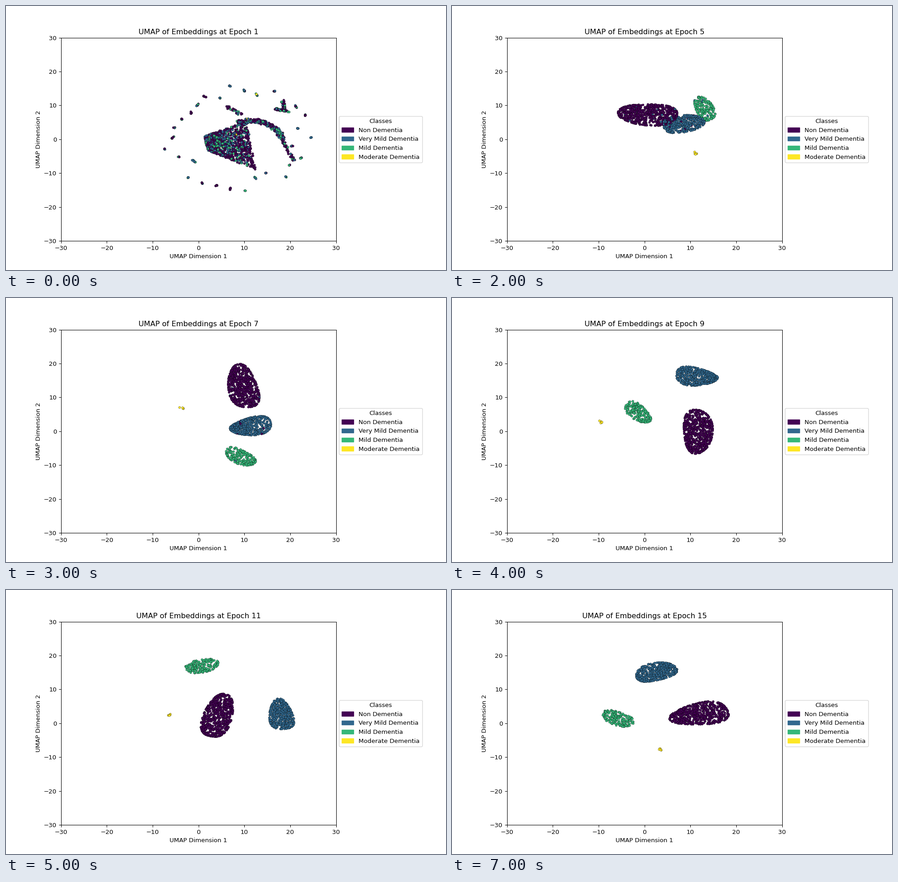
A matplotlib script for the animation above (7500 ms loop, 966x580 px).

```python
import numpy as np
import matplotlib.pyplot as plt
from matplotlib.animation import FuncAnimation
from matplotlib.patches import Patch

W, H, DPI = 966, 580, 96.6
COLORS = np.array(["#440154", "#31688e", "#35b779", "#fde725"])
NAMES = ["Non Dementia", "Very Mild Dementia", "Mild Dementia", "Moderate Dementia"]
COUNTS = [640, 448, 179]
SIZES = [(6.4, 3.1), (4.5, 2.5), (3.6, 1.9)]

# Per class: centre x, y, tilt in degrees, taper; the last pair is the small fourth class.
LAYOUTS = {
    5: [(0.9, 7.3, -3, 0), (8.4, 4.6, 10, 0), (13.1, 9, -70, 0), (11.1, -4.2)],
    7: [(9.7, 13.2, -80, 0.1), (11.2, 1.4, 12, 0.45), (9.1, -7.5, -35, 0), (-3.6, 6.7)],
    9: [(11.6, -0.2, -90, -0.15), (11.6, 16.1, -8, -0.5), (-1.4, 5.5, -50, -0.2), (-9.5, 2.8)],
    11: [(4.2, 2.1, 76, 0), (18, 2.6, -82, 0.2), (0.7, 16.9, 15, 0), (-6.5, 2.4)],
    13: [(15.2, 1.2, 72, 0.2), (1.5, 12.3, 5, 0), (2, -2.5, 85, 0), (-6.9, 0)],
    15: [(12, 2.7, 10, 0.2), (2.6, 15.2, 15, -0.1), (-5.8, 1.4, -25, 0), (3.3, -7.6)],
}

BODY = np.array([[1.3, 0.9], [10.5, 5.5], [1.8, -3.2], [12.5, -9]])
STRANDS = [
    ((18.2, 0), (20.9, -6.5)), ((18.5, 11.4), (18.7, 8.8)),
    ((16.7, 9), (19.7, 8.2)), ((6.2, 9.6), (9.4, 7.2)),
]


def blob(n, centre, size, tilt, taper, rng):
    """n points in a tilted, tapered rounded shape, some of them on its rim."""
    angle = rng.uniform(0, 2 * np.pi, n)
    radius = np.sqrt(np.minimum(rng.uniform(0, 1.17, n), 1))
    radius *= 1 + 0.05 * np.sin(3 * angle + rng.uniform(0, 6))
    c, s = np.cos(angle), np.sin(angle)
    u = radius * np.sign(c) * np.abs(c) ** 0.88
    v = radius * np.sign(s) * np.abs(s) ** 0.88 * (1 + taper * u)
    x, y = size[0] * u, size[1] * v
    t = np.radians(tilt)
    return np.c_[x * np.cos(t) - y * np.sin(t), x * np.sin(t) + y * np.cos(t)] + centre


def strand(start, end, n, spread, rng):
    t = rng.uniform(0, 1, (n, 1))
    return start + t * np.subtract(end, start) + rng.uniform(-spread, spread, (n, 2))


def pick(purple, rng):
    """Random labels, given each point's chance of being in the first class."""
    rest = rng.choice([1, 2, 3], len(purple), p=[0.64, 0.35, 0.01])
    return np.where(rng.uniform(size=len(purple)) < purple, 0, rest)


def scattered(rng):
    """Untrained: a mixed body and arc inside a ring of small islands."""
    u, v = rng.uniform(0, 1, (2, 900, 1))
    a, b, c, d = BODY
    body = (1 - v) * ((1 - u) * a + u * b) + v * ((1 - u) * c + u * d)
    parts = [(body, 0.24 + 0.045 * body[:, 0] - 0.015 * body[:, 1])]

    t = np.radians(rng.uniform(8, 115, 240))
    arc = np.c_[11.5 + 6.8 * np.cos(t), -1 + 6.5 * np.sin(t)]
    parts.append((arc + rng.uniform(-0.6, 0.6, arc.shape), 0.4))
    parts += [(strand(p, q, 45, 0.3, rng), 0.6) for p, q in STRANDS]

    for t in np.linspace(0, 2 * np.pi, 30, endpoint=False):
        r = rng.uniform(0.72, 1)
        p = np.array([8.5 + 16.4 * r * np.cos(t), 0.5 + 16.2 * r * np.sin(t)])
        step = rng.uniform(-0.7, 0.7, 2)
        n = 3 + int(6 * np.hypot(*step))
        parts.append((strand(p - step / 2, p + step / 2, n, 0.1, rng), rng.choice([0.2, 0.8])))

    xy = np.vstack([p for p, _ in parts])
    chance = np.concatenate([np.broadcast_to(w, len(p)) for p, w in parts])
    return xy, pick(chance, rng)


def sorting(epoch, rng):
    """One bent cloud whose classes order themselves from left to right."""
    xy = blob(sum(COUNTS), (5, 5.5), (12.3 - 0.4 * epoch, 3), 0, 0, rng)
    xy[:, 1] += 0.03 * (xy[:, 0] - 5) ** 2 - 1
    key = xy[:, 0] + rng.normal(0, 12 * 0.5 ** (epoch - 1), len(xy))
    rank = np.argsort(np.argsort(key))
    return xy, np.searchsorted(np.cumsum(COUNTS), rank, side="right")


def separated(epoch, rng):
    """One blob per class; even epochs vary the layout that follows them."""
    *main, small = LAYOUTS[epoch + (epoch % 2 == 0)]
    nudge = rng.normal(0, 1, (4, 2)) * (epoch % 2 == 0)
    parts = [blob(n, np.add((x, y), d), size, tilt, taper, rng)
             for n, size, (x, y, tilt, taper), d in zip(COUNTS, SIZES, main, nudge)]
    parts.append(small + nudge[3] + rng.normal(0, 0.25, (5, 2)))
    label = np.repeat(range(4), [len(p) for p in parts])
    wrong = (rng.uniform(size=len(label)) < 0.5 ** epoch) & (label < 3)
    label[wrong] = np.where(label[wrong] == 1, 0, 1)
    return np.vstack(parts), label


def points(epoch):
    rng = np.random.default_rng(epoch)
    if epoch == 1:
        xy, label = scattered(rng)
    elif epoch < 5:
        xy, label = sorting(epoch, rng)
    else:
        xy, label = separated(epoch, rng)
    order = rng.permutation(len(xy))
    return xy[order], label[order]


# The tiny margin keeps the pixel size from rounding down.
fig, ax = plt.subplots(figsize=((W + 1e-6) / DPI, (H + 1e-6) / DPI), dpi=DPI)
fig.subplots_adjust(left=0.125, right=0.75, bottom=0.11, top=0.88)
ax.set(xlim=(-30, 30), ylim=(-30, 30), xlabel="UMAP Dimension 1", ylabel="UMAP Dimension 2")
ax.legend(handles=[Patch(color=c, label=n) for c, n in zip(COLORS, NAMES)],
          title="Classes", loc="center left", bbox_to_anchor=(1, 0.5))
dots = ax.scatter([], [], s=13, edgecolors="k", linewidths=0.25)


def draw(i):
    xy, label = points(i + 1)
    dots.set_offsets(xy)
    dots.set_facecolor(COLORS[label])
    ax.set_title(f"UMAP of Embeddings at Epoch {i + 1}")
    return [dots]


anim = FuncAnimation(fig, draw, frames=15, interval=500, repeat=True, repeat_delay=0, blit=False)
plt.show()
```
